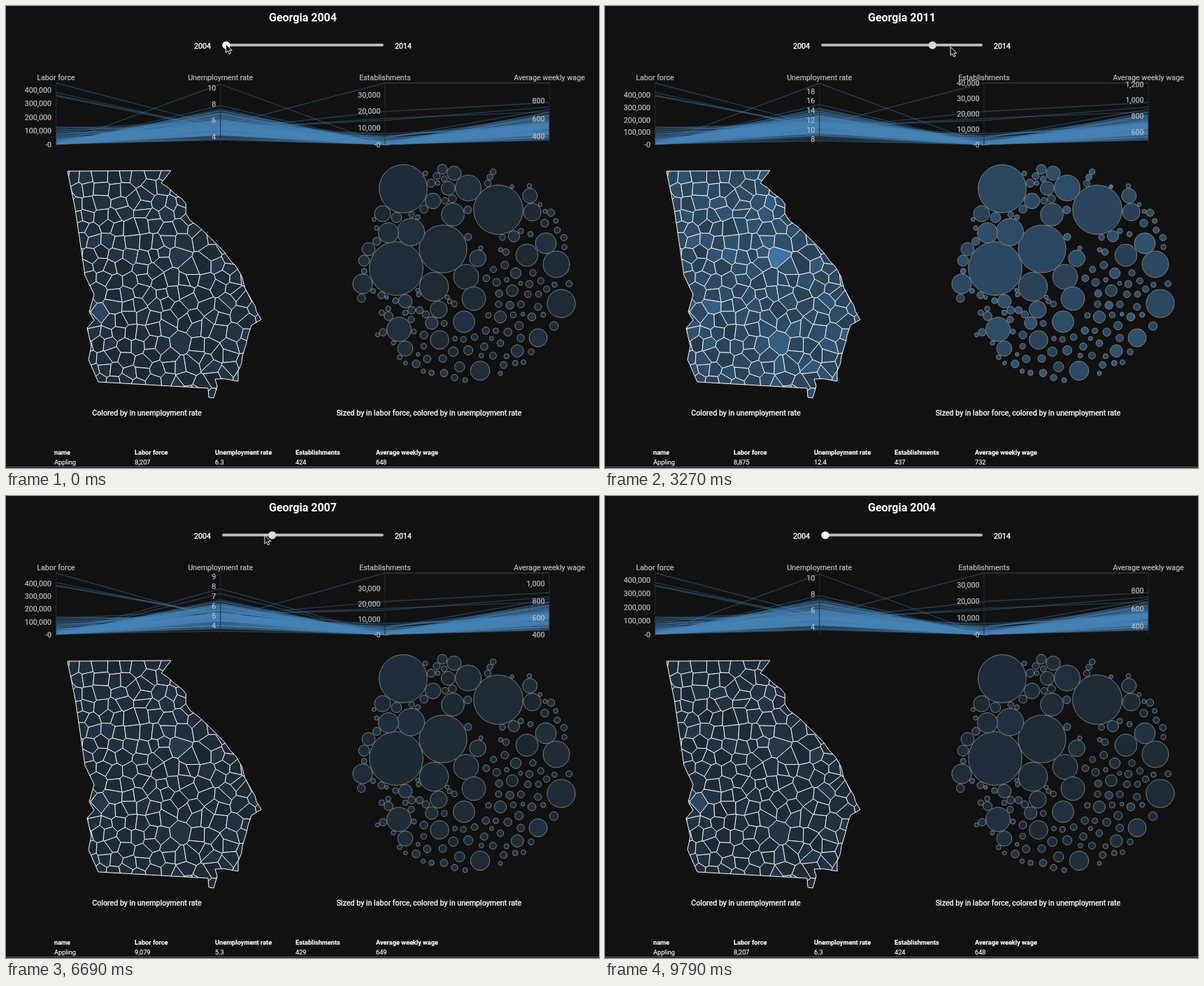
An HTML page for the animation above (9890 ms loop, 848 by 660 pixels).

```html
<!DOCTYPE html>
<html lang="en">
<head>
<meta charset="utf-8">
<title>Georgia labor data</title>
<style>
  html, body { margin: 0; height: 100%; overflow: hidden; background: #111; }
  svg { display: block; width: 100vw; height: 100vh; font: 10.7px Roboto, Arial, sans-serif; }
  text { fill: #fff; }
  .mid { text-anchor: middle; }
  .plain { stroke: #fff; stroke-width: .35; }
  .axis text { fill: #c0c0c0; stroke: #c0c0c0; stroke-width: .2; }
  .tick { text-anchor: end; }
  .lines path { fill: none; stroke: steelblue; stroke-opacity: .36; stroke-width: 1.4; }
  .cells path { stroke: #fff; stroke-width: .9; stroke-linejoin: round; }
  .bubbles circle { stroke: #8f9397; stroke-width: .8; }
  .table { font-size: 9.2px; }
  .table text { stroke: #fff; stroke-width: .15; }
</style>
</head>
<body>
<svg viewBox="0 0 848 660" id="stage"></svg>
<script>
const LOOP = 9890, FIRST = 2004, TOP = 110, BOTTOM = 198, COUNT = 159;
const stage = document.getElementById('stage');

function add(parent, tag, attrs = {}, text) {
  const el = document.createElementNS('http://www.w3.org/2000/svg', tag);
  for (const key in attrs) el.setAttribute(key, attrs[key]);
  if (text !== undefined) el.textContent = text;
  return parent.appendChild(el);
}
const group = name => add(stage, 'g', { class: name });

function randomFrom(seed) {
  return () => {
    seed = (seed + 0x6D2B79F5) | 0;
    let v = Math.imul(seed ^ (seed >>> 15), 1 | seed);
    v = (v + Math.imul(v ^ (v >>> 7), 61 | v)) ^ v;
    return ((v ^ (v >>> 14)) >>> 0) / 4294967296;
  };
}
const clamp = (v, lo, hi) => Math.min(hi, Math.max(lo, v));
const mix = (a, b, k) => a + (b - a) * k;
const path = points => 'M' + points.map(p => p.map(v => v.toFixed(1))).join('L');
const distance = (a, b) => Math.hypot(a[0] - b[0], a[1] - b[1]);

// Values between key rows of the form [position, ...values]
function between(rows, at) {
  const next = rows.findIndex(r => r[0] > at);
  const i = next < 0 ? rows.length - 1 : next;
  const a = rows[i - 1], b = rows[i], k = (at - a[0]) / (b[0] - a[0]);
  return a.slice(1).map((v, j) => mix(v, b[j + 1], k));
}

// Low and high of each measure, y years after the first
const boom = y => Math.exp(-(((y - 3) / 2) ** 2));
const crisis = y => clamp((y - 3) / 2, 0, 1);
const after = (y, start) => Math.max(0, y - start);
const axes = [
  { name: 'Labor force', x: 71.5, step: () => 100000,
    lo: () => 700,
    hi: y => 1000 * (450 + 7 * y + 12 * boom(y)) },
  { name: 'Unemployment rate', x: 306.7, step: span => span > 7 ? 2 : 1,
    lo: y => 3.05 + 3.1 * crisis(y) + .37 * clamp(y - 5, 0, 2) - .65 * after(y, 7),
    hi: y => 10.6 - .42 * Math.min(y, 3) + 10.4 * crisis(y) - 2.5 * after(y, 7) },
  { name: 'Establishments', x: 542, step: () => 10000,
    lo: () => 30,
    hi: y => 1000 * (37 + .47 * y + 1.4 * boom(y) + .6 * after(y, 7)) },
  { name: 'Average weekly wage', x: 777, step: () => 200,
    lo: y => 310 + 145 * (1 - Math.exp(-y / 3)),
    hi: y => 993 + 32 * y + 40 * boom(y) }
];
// Key years of the table row: labor force, rate, establishments, wage
const appling = [
  [0, 8207, 6.3, 424, 648], [2, 8834, 5.5, 435, 634], [3, 9079, 5.3, 429, 649],
  [5, 9455, 10.1, 431, 679], [7, 8875, 12.4, 437, 732], [9, 8678, 10.7, 439, 757]
];

// Bubbles: size follows rank, the largest are placed, the rest fill the gaps
function radius(rank) {
  if (rank < 4) return 34 + 4.4 * .3 ** rank;
  return Math.max(20.7 * Math.exp((4 - rank) / 34), 7.2 - 4.6 * rank / COUNT);
}
function packBubbles() {
  const rand = randomFrom(11), center = [655, 380];
  const list = [
    [558,375], [704,291], [568,261], [625,347], [612,401], [794,425], [579,323], [787,369], [661,260], [658,387],
    [562,462], [669,418], [639,298], [745,356], [655,451], [772,339], [547,324], [510,397], [678,521], [620,477], [761,474]
  ].map((p, rank) => [...p, radius(rank)]);
  function place(r, loose) {
    let best, bestSlack = Infinity;
    for (let tries = 0; tries < 700; tries++) {
      const p = [mix(495, 815, rand()), mix(225, 535, rand())];
      if (distance(p, center) + r > 158 || (p[0] + p[1] > 1065) !== loose) continue;
      const slack = Math.min(...list.map(c => distance(p, c) - c[2])) - r - (loose ? 4.5 : .4);
      if (slack < 0 || slack >= bestSlack) continue;
      best = [...p, r];
      bestSlack = slack;
      if (loose) break;
    }
    return best;
  }
  for (let rank = list.length; rank < COUNT; rank++) {
    const loose = rank > 32 && rand() < .55, r = radius(rank);
    const bubble = place(r, loose) || place(r, !loose);
    if (bubble) list.push(bubble);
  }
  return list;
}
const bubbles = packBubbles();

// Counties that stand out: site, early level, late level
const hot = [
  { site: [245, 357], early: .55, late: 1 },
  { site: [135, 440], early: 1, late: .3 },
  { site: [303, 370], early: .6, late: .55 },
  { site: [250, 482], early: .5, late: .62 }
];
const rand = randomFrom(5);
const bell = () => (rand() + rand()) / 2;
const counties = bubbles.map((bubble, i) => {
  const labor = (bubble[2] / bubbles[0][2]) ** 2;
  const rate = mix(bell(), .42, Math.sqrt(labor));
  const levels = hot[bubbles.length - 1 - i] || { early: .03 + .57 * rate, late: .04 + .6 * rate };
  return {
    labor, levels,
    phase: rand() * 6.28,
    office: i === 0 ? 1 : labor ** 1.1 * (.5 + .2 * rand()),
    wage: i === 0 ? 1 : clamp(.03 + .46 * bell() + .4 * labor + .2 * rand() ** 8, 0, .75)
  };
});

function rateLevel({ levels, phase }, year) {
  const drift = .035 * Math.sin(year * 1.1 + phase);
  return clamp(mix(levels.early, levels.late, clamp((year - 1) / 4, 0, 1)) + drift, 0, 1);
}

// Map: an outline from key points, roughened along the river and the coast
const corners = [
  [88,236], [236,235], [222,253], [252,276], [263,306], [304,343], [329,372], [351,420], [365,448],
  [351,456], [338,500], [332,536], [299,533], [302,543], [297,560], [290,559], [289,546], [132,537],
  [118,505], [122,486], [116,460], [126,449], [119,437], [126,412], [113,385], [99,290]
];
const outline = corners.flatMap((p, i) => {
  const q = corners[(i + 1) % corners.length];
  const rough = p[0] > 220 && q[0] > 220 && distance(p, q) > 25 && distance(p, q) < 100;
  if (!rough) return [p];
  const bend = k => [mix(p[0], q[0], k) + (rand() - .5) * 5, mix(p[1], q[1], k) + (rand() - .5) * 5];
  return [p, bend(.3), bend(.65)];
});

// Counties: jittered grid sites, cut into nearest-site cells
function makeSites() {
  const sites = hot.map(h => h.site);
  for (let y = 243; y < 565; y += 18.5) {
    const shift = rand() * 14;
    for (let x = 76 + shift; x < 372; x += 18.5) {
      const wobble = x < 190 ? 11 : 16;
      const p = [x + (rand() - .5) * wobble, y + (rand() - .5) * wobble];
      if (hot.every(h => distance(p, h.site) > 16)) sites.push(p);
    }
  }
  return sites;
}
function cutCloser(poly, p, q) {
  const side = v => (v[0] - (p[0] + q[0]) / 2) * (q[0] - p[0]) + (v[1] - (p[1] + q[1]) / 2) * (q[1] - p[1]);
  const out = [];
  poly.forEach((a, i) => {
    const b = poly[(i + 1) % poly.length], sa = side(a), sb = side(b);
    if (sa <= 0) out.push(a);
    if (sa * sb < 0) out.push([mix(a[0], b[0], sa / (sa - sb)), mix(a[1], b[1], sa / (sa - sb))]);
  });
  return out;
}
const sites = makeSites();
const frame = [[70, 220], [380, 220], [380, 575], [70, 575]];
const cellShape = p => sites.reduce((poly, q) => q === p ? poly : cutCloser(poly, p, q), frame);

// Static parts
add(stage, 'rect', { width: 848, height: 660, fill: '#111' });
const title = add(stage, 'text', { class: 'mid', x: 424.5, y: 21.5, 'font-size': 16, 'font-weight': 700 });
add(stage, 'text', { class: 'plain', x: 269, y: 60.5 }, FIRST);
add(stage, 'text', { class: 'plain', x: 556, y: 60.5 }, FIRST + 10);
add(stage, 'rect', { x: 309, y: 53.8, width: 231, height: 4, rx: 2, fill: '#aaa' });
add(stage, 'rect', { x: 310, y: 54.8, width: 229, height: 1.6, rx: .8, fill: '#c9c9c9' });
const thumb = add(stage, 'circle', { cy: 56, r: 5.6 });

const lineLayer = group('lines');
const lines = counties.map(() => add(lineLayer, 'path'));
const axisLayer = group('axis');
for (const axis of axes) {
  add(axisLayer, 'path', { d: `M${axis.x} ${TOP}V${BOTTOM}`, stroke: '#222b33' });
  add(axisLayer, 'text', { class: 'mid', x: axis.x, y: 106 }, axis.name);
}
const tickLayer = add(axisLayer, 'g');

const clip = add(add(stage, 'defs'), 'clipPath', { id: 'state' });
add(clip, 'path', { d: path(outline) + 'Z' });
const cellLayer = group('cells');
cellLayer.setAttribute('clip-path', 'url(#state)');
const cells = sites.map(p => add(cellLayer, 'path', { d: path(cellShape(p)) + 'Z' }));
add(stage, 'path', { d: path(outline) + 'Z', fill: 'none', stroke: '#fff', 'stroke-linejoin': 'round' });

const bubbleLayer = group('bubbles');
const discs = bubbles.map(([cx, cy, r]) => add(bubbleLayer, 'circle', { cx, cy, r }));
add(stage, 'text', { class: 'mid plain', x: 201.5, y: 585 }, 'Colored by in unemployment rate');
add(stage, 'text', { class: 'mid plain', x: 605, y: 585 }, 'Sized by in labor force, colored by in unemployment rate');

const table = group('table');
const column = i => 69 + i * 115;
['name', ...axes.map(a => a.name)].forEach((name, i) =>
  add(table, 'text', { x: column(i), y: 641, 'font-weight': 700 }, name));
add(table, 'text', { x: column(0), y: 654.5 }, 'Appling');
const values = axes.map((_, i) => add(table, 'text', { x: column(i + 1), y: 654.5 }));
add(stage, 'rect', { y: 658, width: 848, height: 1, fill: '#666' });
const cursor = add(stage, 'path', { d: 'M0 0V12.2L2.8 9.6 4.7 14 6.9 13 5 8.8H8.8Z',
  fill: '#111', stroke: '#eee', 'stroke-linejoin': 'round' });

function rateColor(rate) {
  const k = clamp((rate - 3.5) / 19, 0, 1);
  return `rgb(${[[27, 70], [36, 130], [45, 180]].map(([a, b]) => Math.round(mix(a, b, k)))})`;
}

function drawYear(year) {
  title.textContent = 'Georgia ' + (FIRST + year);
  thumb.setAttribute('cx', 315 + 21.9 * year);
  thumb.setAttribute('fill', year ? '#d9d9d9' : '#f4f4f4');
  tickLayer.textContent = '';
  for (const axis of axes) {
    const lo = axis.lo(year), hi = axis.hi(year), step = axis.step(hi - lo);
    for (let v = Math.ceil(lo / step - .02) * step; v <= hi; v += step)
      add(tickLayer, 'text', { class: 'tick', x: axis.x - 6.5, y: mix(BOTTOM, TOP, (v - lo) / (hi - lo)) + 3.8 },
        v.toLocaleString('en-US'));
  }
  const colors = counties.map((c, i) => {
    const rate = rateLevel(c, year);
    const levels = [c.labor, rate, c.office, c.wage];
    lines[i].setAttribute('d', path(levels.map((v, k) => [axes[k].x, mix(BOTTOM, TOP, v)])));
    return rateColor(mix(axes[1].lo(year), axes[1].hi(year), rate));
  });
  discs.forEach((disc, i) => disc.setAttribute('fill', colors[i]));
  cells.forEach((cell, i) => cell.setAttribute('fill', colors[colors.length - 1 - i % colors.length]));
  between(appling, year).forEach((v, i) =>
    values[i].textContent = i === 1 ? v.toFixed(1) : Math.round(v).toLocaleString('en-US'));
}

// The year climbs at an even pace, then drops back ever more slowly
const climb = k => 640 + 430 * k;
const drop = k => 4870 + 130 * k + 28 * k * k;
function yearAt(t) {
  let year = 0;
  for (let k = 0; k < 10; k++) year += (t >= climb(k)) - (t >= drop(k));
  return year;
}

const cursorStops = [
  [0, 314.5, 54.5], [270, 314.5, 54.5], [1730, 408, 56], [3270, 494, 58.5], [4150, 540, 58], [4930, 447, 56],
  [5850, 416, 57], [7470, 327, 55], [8350, 318, 56], [8770, 862, 62], [LOOP, 862, 62]
];

let shown = -1;
function render(t) {
  const year = yearAt(t);
  if (year !== shown) drawYear(shown = year);
  cursor.setAttribute('transform', `translate(${between(cursorStops, t)})`);
}

const start = performance.now();
function tick() {
  render((performance.now() - start) % LOOP);
  requestAnimationFrame(tick);
}
render(0);
tick();
</script>
</body>
</html>
```
